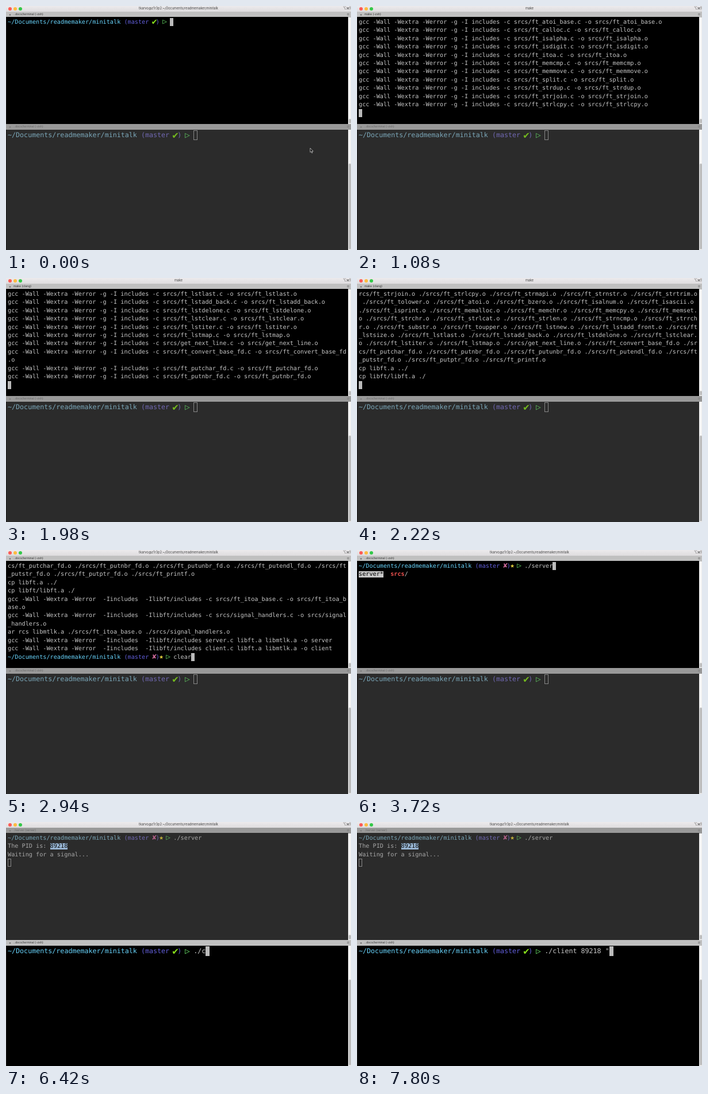
Write an HTML page that moves like this. It is 600 by 426 pixels and loops after 8000 ms.

```html
<!DOCTYPE html>
<html lang="en">
<head>
<meta charset="utf-8">
<title>Terminal session</title>
<style>
html, body { margin: 0; width: 100%; height: 100%; overflow: hidden; background: #000; }
#stage { position: relative; width: 600px; height: 426px; overflow: hidden; background: #f4f4f4; font-family: Inter, "Liberation Sans", sans-serif; }
#stage * { box-sizing: border-box; }
#stage > *, .tab > *, .bar > * { position: absolute; }
.bar { left: 0; top: 0; width: 600px; height: 10px; background: linear-gradient(#eceaec, #dedcde); font-size: 5.6px; line-height: 9.6px; color: #444; }
.bar i { width: 6px; height: 6px; top: 1.5px; border-radius: 50%; }
#title { left: 0; right: 0; text-align: center; }
.tab { left: 0; width: 600px; height: 10px; font-size: 5.1px; line-height: 9px; color: #333; background: #c0c0c0; }
.tab.off { background: #999; color: #666; }
.tab b { font-weight: 400; left: 5px; font-size: 6px; }
.tab span { left: 13px; white-space: pre; }
.tab i { left: 593px; top: 3px; width: 4px; height: 3px; border: solid #808080; border-width: 1px 0; }
.pane { left: 0; width: 595px; background: #000; border-left: 1px solid #1c1c1c; overflow: hidden; }
.pane.off { background: #2b2b2b; }
pre { position: absolute; left: 2px; margin: 0; color: #c7c7c7; font-family: "DejaVu Sans Mono", monospace; text-rendering: geometricPrecision; }
.off pre { opacity: .8; }
#top pre { top: 2.7px; font-size: 10.2px; line-height: 14.45px; }
#bottom pre { top: 2.4px; font-size: 11.68px; line-height: 15.6px; }
.path { color: #68d3fb; } .git { color: #625fda; } .ok { color: #86dc1c; } .bad { color: #d06c9c; }
.off .path { color: #8fc6dc; } .off .git { color: #8278d4; }
.star { color: #e6d23c; } .arrow { color: #66d966; } .dir { color: #f0524f; font-weight: 700; }
.icon { display: inline-block; width: 1ch; text-align: center; transform: scale(1.25); }
.ok { transform: scale(1.5); }
.pick { background: #c7c7c7; color: #000; }
.sel { background: #b4d8fd; color: #000; }
.cur { display: inline-block; position: relative; top: -1px; width: 1ch; height: 1.4em; vertical-align: top; background: #bbb; }
.off .cur { background: none; box-shadow: inset 0 0 0 1px #a0a0a0; }
.thumb { left: 595.5px; width: 4px; border-radius: 2px; background: #bdbdbd; }
</style>
</head>
<body>
<div id="stage">
  <div class="bar">
    <i style="left:4px;background:#fc5b57"></i><i style="left:12.5px;background:#fdbc40"></i><i style="left:21.5px;background:#34c84a"></i>
    <span id="title"></span><span style="left:586px">⌥⌘1</span>
  </div>
  <div class="tab" id="tab1" style="top:10px"><b>×</b><span></span><i></i></div>
  <div class="pane" id="top" style="top:19px;height:187px"><pre></pre></div>
  <div class="tab" id="tab2" style="top:206px"><b>×</b><span></span><i></i></div>
  <div class="pane" id="bottom" style="top:216px;height:210px"><pre></pre></div>
  <div class="thumb" style="top:197px;height:8px"></div>
  <div class="thumb" style="top:275px;height:150px"></div>
  <svg id="mouse" width="8" height="11" viewBox="-1 -1 8 11"><path d="M0 0V7.4L1.7 5.9 2.9 8.7 4.1 8.2 2.9 5.5H5.2Z" fill="#111" stroke="#ddd" stroke-width=".7"/></svg>
</div>
<script>
const LOOP = 8000, TICK = 60, ROWS = 12, COLS = 96;
const SHELL = "tkarvo@z1r3p2:~/Documents/readmemaker/minitalk";
const SHELL_TAB = "..docs/terminal (-zsh)";
const CURSOR = '<span class="cur"></span>';
const $ = q => document.querySelector(q);
const span = (cls, s) => `<span class="${cls}">${s}</span>`;

const sources = ("atoi_base calloc isalpha isdigit itoa memcmp memmove split strdup strjoin strlcpy " +
  "strmapi strnstr strtrim tolower atoi bzero isalnum isascii isprint memalloc memchr memcpy memset strchr " +
  "strlcat strlen strncmp strrchr substr toupper lstnew lstadd_front lstsize lstlast lstadd_back lstdelone " +
  "lstclear lstiter lstmap get_next_line convert_base_fd putchar_fd putnbr_fd putunbr_fd putendl_fd " +
  "putstr_fd putptr_fd printf").split(" ").map(s => "srcs/" + (s == "get_next_line" ? s : "ft_" + s));

const gcc = "gcc -Wall -Wextra -Werror ";
const flags = gcc + " -Iincludes  -Ilibft/includes ";
const build = s => `-c ${s}.c -o ${s}.o`;

// Build output as [time, line]
const log = [
  [780, "make -C libft"],
  ...sources.map((s, i) => [790 + 27.5 * i, gcc + "-g -I includes " + build(s)]),
  [2160, "ar rcs libft.a " + sources.map(s => `./${s}.o`).join(" ")],
  [2200, "cp libft.a ../"],
  [2220, "cp libft/libft.a ./"],
  [2260, flags + build("srcs/ft_itoa_base")],
  [2310, flags + build("srcs/signal_handlers")],
  [2360, "ar rcs libmtlk.a ./srcs/ft_itoa_base.o ./srcs/signal_handlers.o"],
  [2400, flags + "server.c libft.a libmtlk.a -o server"],
  [2480, flags + "client.c libft.a libmtlk.a -o client"]
];

// Pointer path as [time, x, y]; hidden outside the two spans
const paths = [
  [[0, 529, 248], [180, 520, 240], [240, 520, 240]],
  [[4260, 429, 294], [4740, 160, 70], [4920, 92, 43], [5220, 92, 43], [5580, 335, 220], [5760, 339.5, 270], [6300, 339.5, 270]]
];

const typed = (t, text, start) => text.slice(0, Math.max(0, Math.floor((t - start) / TICK) + 1));

function prompt(clean, text) {
  const mark = clean ? span("icon ok", "✔") : span("icon bad", "✘");
  return span("path", "~/Documents/readmemaker/minitalk") + " " + span("git", "(master ") + mark + span("git", ")") +
    (clean ? "" : span("icon star", "★")) + " " + span("icon arrow", "▷") + " " + text;
}

function topRows(t) {
  if (t < 3060) {
    const rows = [prompt(true, typed(t, "make", 480))];
    for (const [at, line] of log) if (at <= t) rows.push(...line.match(new RegExp(`.{1,${COLS}}`, "g")));
    if (t >= 2560) rows.push(prompt(false, typed(t, "clear", 2700)));
    else if (t >= 720) rows.push("");
    rows[rows.length - 1] += CURSOR;
    return rows.slice(-ROWS);
  }
  if (t < 3960) {
    const done = t >= 3660;
    const rows = [prompt(false, done ? "./server" : typed(t, "./s", 3240)) + CURSOR];
    if (t >= 3480 && t < 3840) rows.push((done ? span("pick", "server*") : "server*") + "  " + span("dir", "srcs") + "/");
    return rows;
  }
  const pid = t >= 5100 ? span("sel", "89218") : "89218";
  return [prompt(false, "./server"), "The PID is: " + pid, "Waiting for a signal...", CURSOR];
}

function command(t) {
  return (t < 6600 ? typed(t, "./cli", 6300) : "./client ") +
    (t >= 7140 ? "89218" : "") + (t >= 7560 ? " " : "") + (t >= 7740 ? '"' : "");
}

function placeMouse(t) {
  const path = paths.find(p => t >= p[0][0] && t < p[p.length - 1][0]);
  const mouse = $("#mouse");
  mouse.style.display = path ? "" : "none";
  if (!path) return;
  const i = path.findIndex(p => p[0] > t), [t0, x0, y0] = path[i - 1], [t1, x1, y1] = path[i];
  const k = (t - t0) / (t1 - t0), e = k * k * (3 - 2 * k);
  mouse.style.left = x0 + (x1 - x0) * e - 1 + "px";
  mouse.style.top = y0 + (y1 - y0) * e - 1 + "px";
}

function draw(t) {
  const below = t >= 5940, making = t >= 720 && t < 2560, serving = t >= 3960;
  $("#title").textContent = making ? "make" : serving && !below ? "./server" : SHELL;
  $("#tab1 span").textContent = making ? (t < 1320 ? "make (-zsh)" : "make (clang)") : serving ? "./server (server)" : SHELL_TAB;
  $("#tab2 span").textContent = SHELL_TAB;
  for (const id of ["#tab1", "#top"]) $(id).classList.toggle("off", below);
  for (const id of ["#tab2", "#bottom"]) $(id).classList.toggle("off", !below);
  $("#top pre").innerHTML = topRows(t).join("\n");
  $("#bottom pre").innerHTML = prompt(true, command(t)) + CURSOR;
  placeMouse(t);
}

let last = -1;
function frame() {
  const t = Math.floor(performance.now() % LOOP / TICK) * TICK;
  if (t != last) draw(last = t);
  requestAnimationFrame(frame);
}
frame();
</script>
</body>
</html>
```
